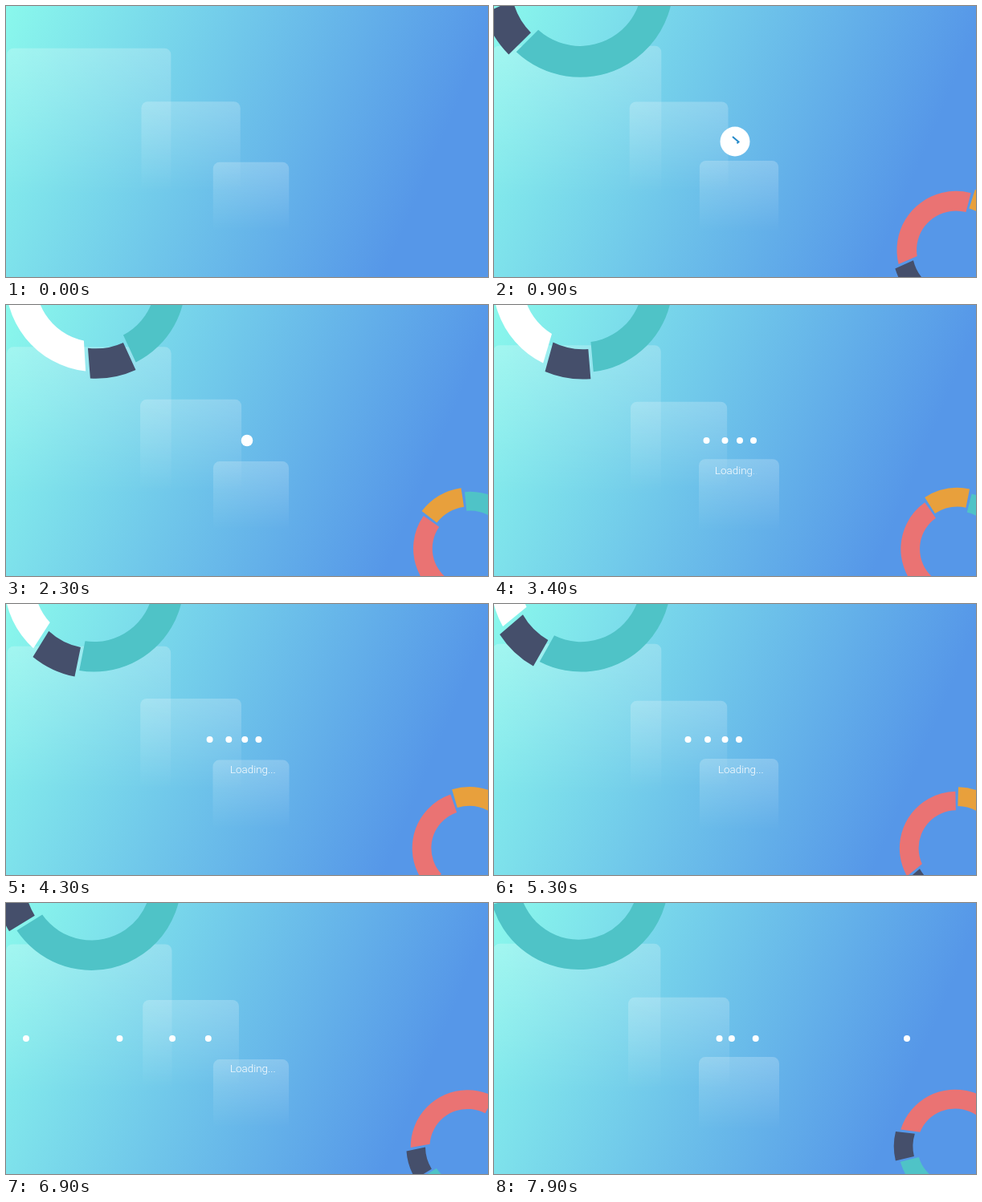
Write an HTML page with a canvas that moves like this. It is 600 px wide and 338 px high and loops after 8000 ms.

```html
<!DOCTYPE html>
<html lang="en">
<head>
<meta charset="utf-8">
<title>Loading</title>
<style>
html, body { margin: 0; width: 100%; height: 100%; overflow: hidden; }
canvas { position: absolute; left: 0; top: 0; }
#label {
  position: absolute; top: 198px; left: 0; line-height: 17px; white-space: nowrap;
  color: #fff; font: 300 13.4px/17px Roboto, sans-serif;
}
</style>
</head>
<body>
<canvas id="stage" width="600" height="338"></canvas>
<div id="label"></div>
<script>
const LOOP = 8000, STEP = 100;
const ctx = document.getElementById('stage').getContext('2d');
const label = document.getElementById('label');
const letters = [...'Loading...'].map(c => {
  const s = document.createElement('span');
  s.textContent = c;
  return label.appendChild(s);
});

const TEAL = '#4fc3c7', DARK = '#454f6b', CORAL = '#ea7373', ORANGE = '#e8a03c';

const clamp = v => Math.max(0, Math.min(1, v));
const part = (t, start, length) => clamp((t - start) / length);
const easeOut = p => 1 - (1 - p) ** 3;
const easeInOut = p => p < .5 ? 4 * p ** 3 : 1 - 4 * (1 - p) ** 3;
const backOut = p => 1 + 2.7 * (p - 1) ** 3 + 1.7 * (p - 1) ** 2;
const wave = (t, peak, period) => Math.cos((t - peak) / period * 2 * Math.PI);

function background() {
  const g = ctx.createLinearGradient(0, 0, 520, 220);
  g.addColorStop(0, '#8af8ec');
  g.addColorStop(1, '#5697e8');
  ctx.fillStyle = g;
  ctx.fillRect(0, 0, 600, 338);
}

// Glass square that fades out downwards; grow moves every side outwards.
function glass(x, y, size, grow) {
  const s = size + 2 * grow, top = y - grow;
  const g = ctx.createLinearGradient(0, top, 0, top + s * .9);
  g.addColorStop(0, 'rgba(255,255,255,.22)');
  g.addColorStop(1, 'rgba(255,255,255,0)');
  ctx.fillStyle = g;
  ctx.beginPath();
  ctx.roundRect(x - grow, top, s, s, 8);
  ctx.fill();
}

// Ring piece with separate outer and inner end angles, in degrees.
function piece(color, outer, a, b, innerA = a, innerB = b) {
  const rad = Math.PI / 180;
  ctx.fillStyle = color;
  ctx.beginPath();
  ctx.arc(0, 0, outer, a * rad, b * rad);
  ctx.arc(0, 0, outer - 37.4, innerB * rad, innerA * rad, true);
  ctx.fill();
}

function ring(t, x, y, size, main) {
  const scale = size * backOut(part(t, .2, .85));
  if (t <= .2 || scale <= 0) return;
  const angle = 18 * t + 314 * (1 - part(t, 0, 2)) ** 2;
  ctx.save();
  ctx.translate(x, y);
  ctx.rotate(angle * Math.PI / 180);
  ctx.scale(scale, scale);
  ctx.translate(4, 0);
  piece(DARK, 120.3, 24.1, 51.8, 24.1, 55.3);
  piece(main, 111.8, 55, 173.5, 60);
  piece(ORANGE, 120.3, 176.3, 220);
  piece(TEAL, 111.8, 223, 382, 223, 381.1);
  ctx.restore();
}

function dot(x, r) {
  ctx.fillStyle = '#fff';
  ctx.beginPath();
  ctx.arc(x, 169, r, 0, 2 * Math.PI);
  ctx.fill();
}

function button(t) {
  const r = 18.5 * easeOut(part(t, .4, .4)) - 14.5 * easeInOut(part(t, 1.9, .65));
  if (r <= 0) return;
  dot(300, r);
  ctx.save();
  ctx.globalAlpha = 1 - part(t, 1.7, .3);
  ctx.strokeStyle = '#2489c9';
  ctx.lineWidth = 2;
  ctx.setLineDash([19 * part(t, .6, .45), 40]);
  ctx.beginPath();
  ctx.moveTo(297, 163);
  ctx.lineTo(304.5, 169.5);
  ctx.lineTo(297, 176);
  if (t > .6) ctx.stroke();
  ctx.restore();
}

// rest place, drift speed, start of the exit, start of the next entry
const dots = [
  [264.5, 12.1, 5.93, 7.27],
  [287.5, 11.3, 6.11, 7.40],
  [306, 9.7, 6.23, 7.52],
  [323, 9.5, 6.34, 7.81]
];

function dotX(t, [rest, speed, exit, entry]) {
  if (t >= entry) return 274 + 350 * (1 - part(t, entry, 1)) ** 4;
  const x = rest - speed * (t - 3.4) - (6 * Math.max(0, t - exit)) ** 3;
  return 300 + (x - 300) * easeOut(part(t, 2.5, .6));
}

function text(t) {
  label.style.transform = `translateX(${275 + 4 * easeOut(part(t, 3.4, .5))}px)`;
  label.style.opacity = 1 - part(t, 7.2, .4);
  letters.forEach((s, i) => s.style.opacity = part(t, 2.8 + i * .07, .2));
}

function draw(t) {
  background();
  glass(0, 51.3, 206.7, 1.6 * wave(t, .9, 2.2));
  glass(168.7, 119.4, 122.8, 1.6 * wave(t, 2.3, 1.87));
  glass(256.5, 193.6, 97, 1.5 * wave(t, 7.9, 2.2));
  ring(t, 108.6, -31.2, 1, '#fff');
  ring(t, 576, 302, .634, CORAL);
  if (t < 2.55) button(t);
  else dots.forEach(d => dot(dotX(t, d), 4));
  text(t);
}

const start = performance.now();
function frame() {
  const ms = (performance.now() - start) % LOOP;
  draw(Math.floor(ms / STEP) * STEP / 1000);
  requestAnimationFrame(frame);
}
frame();
</script>
</body>
</html>
```
